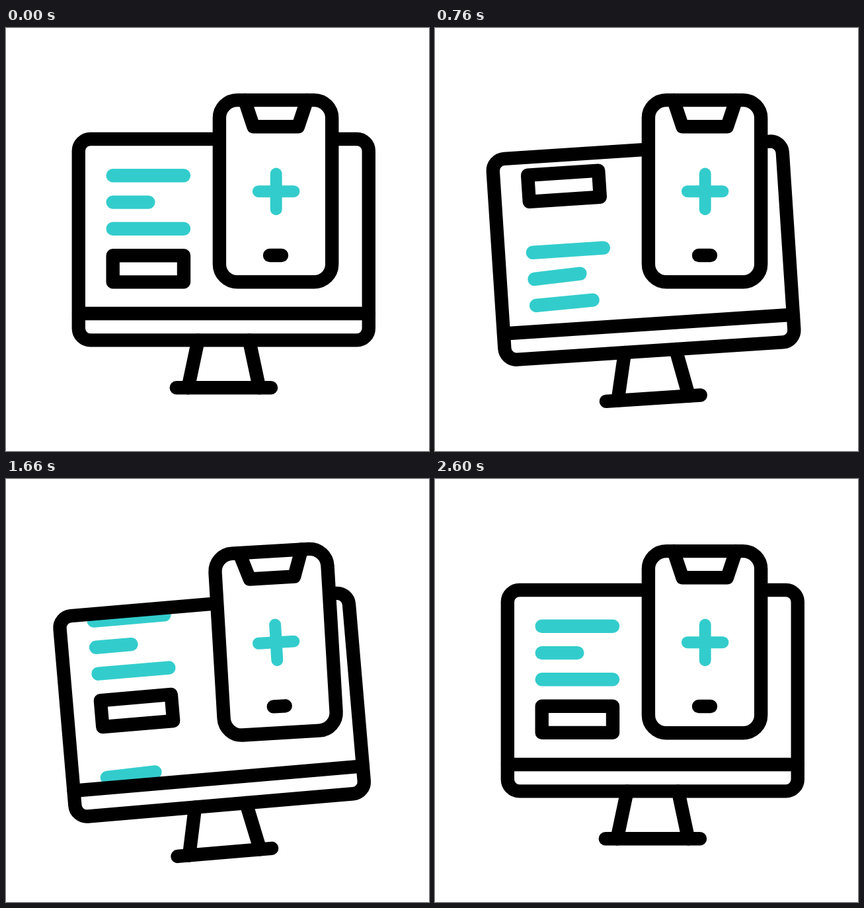
Write an HTML page with a canvas that moves like this. It is 640 px wide and 640 px high and loops after 2820 ms.

```html
<!DOCTYPE html>
<html lang="en">
<head>
<meta charset="utf-8">
<title>Monitor and phone</title>
<style>
  html, body { margin: 0; width: 100%; height: 100%; overflow: hidden; background: #fff; }
  canvas { display: block; width: 640px; height: 640px; }
</style>
</head>
<body>
<canvas id="stage" width="640" height="640"></canvas>
<script>
const ctx = document.getElementById('stage').getContext('2d');

const LOOP = 2820, TICK = 20, HALF = 1300;
const BLACK = '#000', TEAL = '#33cccc', WEIGHT = 20.4;

const TILT = { x: 573, y: 538, degrees: -6 };
const SHAKE = { x: 408.4, y: 246.8, degrees: 10, start: 1342, step: 400 / 3, swings: 7 };

const SCROLL = 238.45, SPACING = 238.2;
const GROW = 533, SETTLE = 133, OVERSHOOT = { x: 20, y: -4 };
const LEFT = 161.7;
const ITEMS = [
  { y: 223.3, length: 107.3, start: 67 },
  { y: 263.6, length: 53.7, start: 305 },
  { y: 303.7, length: 107.3, start: 430 },
  { y: 344.3, length: 107.3, start: 593, height: 40.1 }
];

const ease = u => {
  u = Math.min(1, Math.max(0, u));
  return u * u * (3 - 2 * u);
};

function trace(points, color = BLACK, width = WEIGHT, closed = false) {
  ctx.beginPath();
  points.forEach(([x, y]) => ctx.lineTo(x, y));
  if (closed) ctx.closePath();
  ctx.strokeStyle = color;
  ctx.lineWidth = width;
  ctx.stroke();
}

function roundBox(x, y, w, h, r) {
  ctx.beginPath();
  ctx.roundRect(x, y, w, h, r);
  ctx.strokeStyle = BLACK;
  ctx.lineWidth = WEIGHT;
}

function rotated(pivot, degrees, draw) {
  ctx.save();
  ctx.translate(pivot.x, pivot.y);
  ctx.rotate(degrees * Math.PI / 180);
  ctx.translate(-pivot.x, -pivot.y);
  draw();
  ctx.restore();
}

// Each item stretches past its length, slightly raised, then settles.
function drawItem(item, shift, age) {
  const grown = ease((age - item.start) / GROW);
  const extra = 1 - ease((age - item.start - GROW) / SETTLE);
  const right = LEFT + grown * (item.length + OVERSHOOT.x * extra);
  const lift = grown * OVERSHOOT.y * extra;
  const y = item.y + shift;
  const points = [[LEFT, y], [right, y + lift]];
  if (item.height) {
    points.push([right, y + lift + item.height], [LEFT, y + item.height]);
    trace(points, BLACK, WEIGHT, true);
  } else {
    trace(points, TEAL);
  }
}

function drawContent(t) {
  const scroll = SCROLL * (ease(t / HALF) + ease((t - HALF) / HALF));
  ctx.save();
  ctx.beginPath();
  ctx.rect(110, 168, 439, 264);
  ctx.clip();
  for (let copy = 0; copy < 3; copy++) {
    const age = copy ? t - (copy - 1) * HALF : Infinity;
    if (age < 0) continue;
    ITEMS.forEach(item => drawItem(item, copy * SPACING - scroll, age));
  }
  ctx.restore();
}

function drawMonitor(t) {
  drawContent(t);
  roundBox(109.8, 168, 439, 304.4, 18);
  ctx.stroke();
  trace([[110, 432], [549, 432]]);
  trace([[290.7, 472.4], [275.5, 544.2]]);
  trace([[367.9, 472.4], [383.2, 544.2]]);
  trace([[257.8, 544.2], [401, 544.2]]);
}

function drawPhone() {
  roundBox(322.9, 109.1, 170.3, 275.2, 27);
  ctx.fillStyle = '#fff';
  ctx.fill();
  ctx.stroke();
  trace([[361, 109.1], [374.4, 149.3], [442, 149.3], [455.4, 109.1]]);
  trace([[399, 344], [417, 344]]);
  trace([[381.9, 247.2], [435.4, 247.2]], TEAL, 17.9);
  trace([[408.7, 220.5], [408.7, 274.2]], TEAL, 17.9);
}

function shakeAngle(t) {
  const phase = (t - SHAKE.start) / SHAKE.step;
  if (phase <= 0 || phase >= SHAKE.swings) return 0;
  const pose = k => k === 0 || k === SHAKE.swings ? 0 : k % 2 ? SHAKE.degrees : -SHAKE.degrees;
  const k = Math.floor(phase);
  return pose(k) + (pose(k + 1) - pose(k)) * ease(phase - k);
}

function draw(t) {
  ctx.fillStyle = '#fff';
  ctx.fillRect(0, 0, 640, 640);
  ctx.lineCap = ctx.lineJoin = 'round';
  const tilt = TILT.degrees * ease(1 - Math.abs(t - HALF) / HALF);
  rotated(TILT, tilt, () => drawMonitor(t));
  rotated(SHAKE, shakeAngle(t), drawPhone);
}

const began = performance.now();

function frame() {
  const t = (performance.now() - began) % LOOP;
  draw(Math.min(2 * HALF, Math.floor(t / TICK) * TICK));
  requestAnimationFrame(frame);
}
frame();
</script>
</body>
</html>
```
